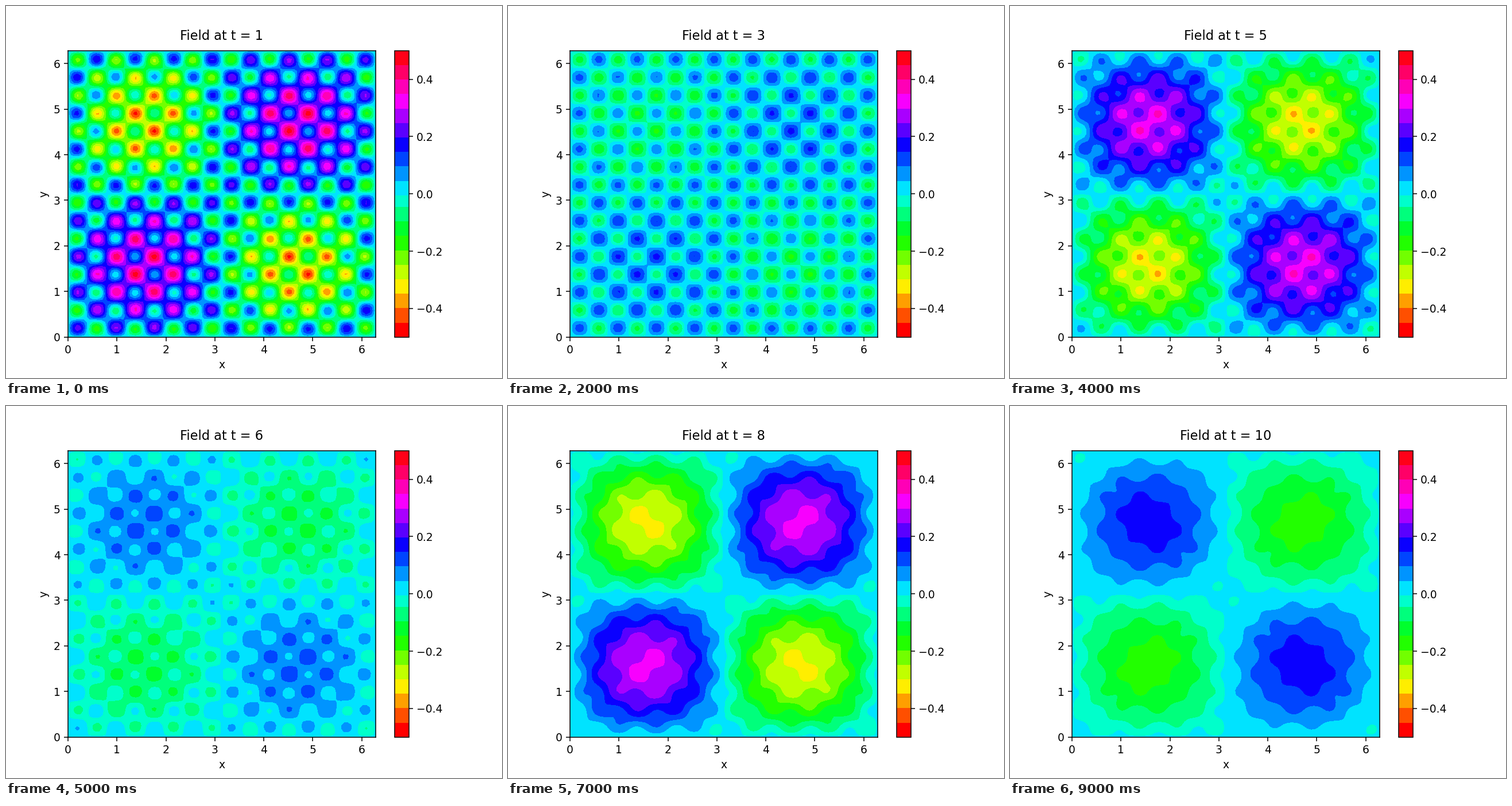
A matplotlib script for the animation above (10 s loop, 864x648 px).

```python
import numpy as np
import matplotlib.pyplot as plt
from matplotlib.animation import FuncAnimation

STEPS = 10
LEVELS = np.linspace(-0.5, 0.5, 100)
HUES = plt.get_cmap("hsv", 20)

axis = np.linspace(0, 2 * np.pi, 100)
X, Y = np.meshgrid(axis, axis)


def field(t):
    """A slow swinging mode plus a fine checkerboard that fades out."""
    slow = 0.318 * np.sin(t)
    fine = 0.285 * np.exp(-0.28 * t)
    return (slow * np.sin(X) * np.sin(Y)
            + fine * np.sin(8 * X) * np.sin(8 * Y))


def fill(t):
    return ax.contourf(X, Y, field(t), levels=LEVELS, cmap=HUES)


fig, ax = plt.subplots(figsize=(6.4, 4.8), dpi=135)
ax.set_xlabel("x")
ax.set_ylabel("y")
title = ax.set_title("Field at t = 1", pad=10)
bands = fill(1)
bar = fig.colorbar(bands, ax=ax, ticks=[-0.4, -0.2, 0, 0.2, 0.4])
bar.minorticks_off()


def update(i):
    global bands
    bands.remove()
    bands = fill(i + 1)
    title.set_text(f"Field at t = {i + 1}")
    return []


anim = FuncAnimation(fig, update, frames=STEPS, init_func=lambda: [],
                     interval=1000, repeat=True, repeat_delay=0)
plt.show()
```
